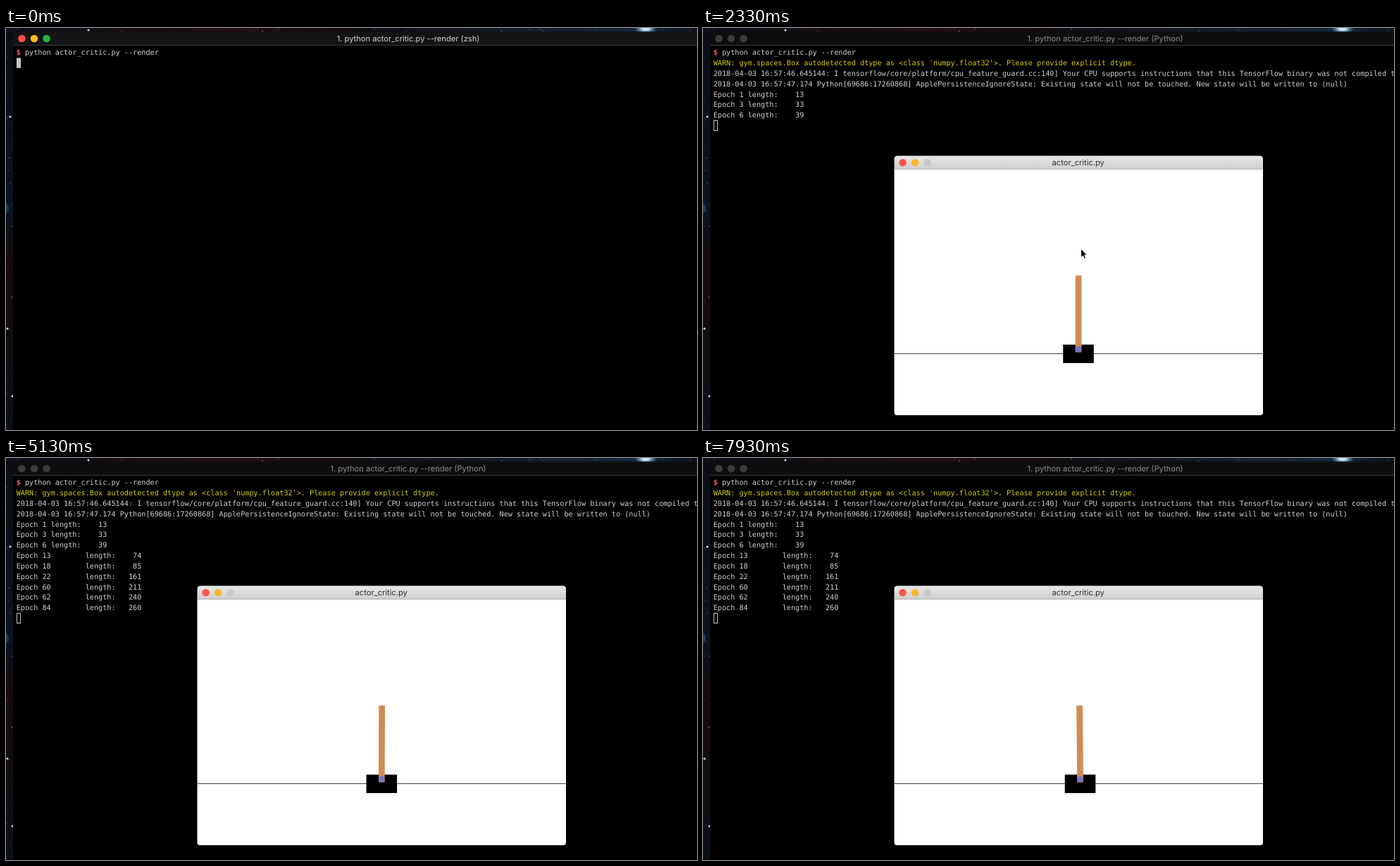
Animation, 981 px wide and 571 px high, one loop 8 s. Source, as an HTML page:

```html
<!DOCTYPE html>
<html lang="en">
<head>
<meta charset="utf-8">
<title>Cart pole training</title>
<style>
  html, body { margin: 0; width: 100%; height: 100%; overflow: hidden; background: #000; }
  svg { display: block; }
  text { text-rendering: geometricPrecision; white-space: pre; }
  .mono { font: 10.185px "DejaVu Sans Mono", monospace; fill: #d2d2d2; }
  .title { font: 11.15px Inter, sans-serif; text-anchor: middle; }
</style>
</head>
<body>
<svg width="981" height="571" viewBox="0 0 981 571">
  <defs>
    <linearGradient id="skyTop">
      <stop offset="0" stop-color="#0b1018"/>
      <stop offset=".33" stop-color="#220e11"/>
      <stop offset=".5" stop-color="#120c12"/>
      <stop offset=".92" stop-color="#14253a"/>
      <stop offset="1" stop-color="#0b111b"/>
    </linearGradient>
    <linearGradient id="skyLeft" x2="0" y2="1">
      <stop offset="0" stop-color="#0a0d14"/>
      <stop offset=".45" stop-color="#0a1420"/>
      <stop offset=".58" stop-color="#16090c"/>
      <stop offset="1" stop-color="#0a0f17"/>
    </linearGradient>
    <radialGradient id="glow">
      <stop offset="0" stop-color="#fff"/>
      <stop offset=".3" stop-color="#b9dcf5"/>
      <stop offset="1" stop-color="#3c78a8" stop-opacity="0"/>
    </radialGradient>
    <linearGradient id="bar" x2="0" y2="1">
      <stop offset="0" stop-color="#e8e8e8"/>
      <stop offset="1" stop-color="#cecece"/>
    </linearGradient>
  </defs>

  <g id="sky">
    <rect width="981" height="8" fill="url(#skyTop)"/>
    <rect y="6" width="12" height="565" fill="url(#skyLeft)"/>
    <ellipse cx="908" cy="1" rx="17" ry="8" fill="url(#glow)"/>
    <ellipse cy="256" rx="4" ry="7" fill="#2b75a8" opacity=".4"/>
  </g>

  <path d="M10 571V10Q10 5.5 14.5 5.5H981V571Z"/>
  <path id="termBar" d="M10 25V10Q10 5.5 14.5 5.5H981V25Z"/>
  <rect x="10" y="24" width="971" height="1" fill="#3b3b3b"/>
  <g id="termLights"></g>
  <text id="termTitle" class="title" x="571" y="19"></text>
  <g id="rows" class="mono"></g>
  <rect id="caret"/>

  <g id="win">
    <path id="winBody" fill="#fff"/>
    <path id="winBar" d="M271.5 201V186Q271.5 181.5 276 181.5H790.5Q795 181.5 795 186V201Z"/>
    <rect id="winEdge" x="271.5" y="200" width="523.5" height="1"/>
    <g id="winLights"></g>
    <text id="winTitle" class="title" x="532.7" y="195.3">actor_critic.py</text>
    <g id="scene">
      <rect x="271.5" y="462.3" width="523.5" height=".75"/>
      <g id="cart">
        <rect x="-21.8" y="449.7" width="43.6" height="26.2"/>
        <rect id="pole" x="-4.36" y="351.6" width="8.72" height="109" fill="#d08b54"/>
        <circle cy="456.2" r="4.36" fill="#7776cb"/>
      </g>
    </g>
  </g>
  <path id="mouse" d="M0 0V12.4L2.9 9.8L4.8 14L6.8 13.1L5 9.1H8.7Z" stroke="#fff" stroke-width=".9"/>
</svg>

<script>
const LOOP = 8000, RATE = 0.015;
const ROW = 14.83, TOP = 34.8;
const EPISODE = 260, FIRST = 1800;    // one printed epoch per episode
const FALLS = 5;                      // early episodes in which the pole tips over
const $ = id => document.getElementById(id);

function add(parent, tag, attrs, text = '') {
  const el = document.createElementNS('http://www.w3.org/2000/svg', tag);
  set(el, attrs);
  el.textContent = text;
  parent.append(el);
  return el;
}
function set(el, attrs) {
  for (const name in attrs) el.setAttribute(name, attrs[name]);
}
function show(el, on) {
  el.style.display = on ? '' : 'none';
}
const mix = (a, b, u) => a + (b - a) * u;
function ease(t, from, to) {
  const u = Math.min(1, Math.max(0, (t - from) / (to - from)));
  return u * u * (3 - 2 * u);
}

// Starry desktop behind the terminal
let seed = 11;
const rand = () => (seed = seed * 16807 % 2147483647) / 2147483647;
const tints = ['#8fa5b8', '#7c4a42', '#54708c', '#6e3030', '#a89888'];
for (let i = 0; i < 260; i++) {
  const top = i < 150;
  add($('sky'), 'circle', {
    cx: rand() * (top ? 981 : 10), cy: rand() * (top ? 5.5 : 571),
    r: 0.3 + rand() ** 3 * 0.8, fill: tints[i % 5], opacity: 0.2 + rand() * 0.45
  });
}
for (const [cx, cy] of [[6, 126], [2, 427], [9, 523], [117, 3]])
  add($('sky'), 'circle', { cx, cy, r: 1.5, fill: '#c9e2f2' });

// Terminal output
const epoch = ([n, length], i) => ({
  at: FIRST + i * EPISODE,
  text: `Epoch ${n}`.padEnd(n < 10 ? 8 : 16) + 'length:' + String(length).padStart(6)
});
const best = { 1: 13, 3: 33, 6: 39, 13: 74, 18: 85, 22: 161, 60: 211, 62: 240, 84: 260 };
const lines = [
  { at: 0, text: '  python actor_critic.py --render' },
  { at: 60, fill: '#d2cf10', text: "WARN: gym.spaces.Box autodetected dtype as <class 'numpy.float32'>. Please provide explicit dtype." },
  { at: 990, text: '2018-04-03 16:57:46.645144: I tensorflow/core/platform/cpu_feature_guard.cc:140] Your CPU supports instructions that this TensorFlow binary was not compiled to use: AVX2 FMA' },
  { at: 1590, text: '2018-04-03 16:57:47.174 Python[69686:17260868] ApplePersistenceIgnoreState: Existing state will not be touched. New state will be written to (null)' },
  ...Object.entries(best).map(epoch)
];
const write = (text, row, style) =>
  add($('rows'), 'text', { x: 14.7, y: TOP + 3.5 + row * ROW, style }, text);
const rows = lines.map(({ text, fill }, i) => write(text, i, fill ? `fill:${fill}` : ''));
write('$', 0, 'fill:#ff5f55;font-weight:bold');

// Window buttons
const lights = (id, x, cy) => [0, 1, 2].map(i =>
  add($(id), 'circle', { cx: x + i * 17.5, cy, r: 5.3 }));
const termLights = lights('termLights', 22.5, 15);
const winLights = lights('winLights', 283.6, 191.2);
const paint = (dots, colours) => dots.forEach((dot, i) => set(dot, { fill: colours[i] }));

// Balanced stretch: [time, cart x, pole angle], with a swaying wobble in between
const keys = [[FIRST + FALLS * EPISODE, 534, 0], [3133, 532.8, 1.3], [4200, 530.2, -2],
  [5133, 533.3, 0.2], [6333, 537.6, 1.3], [7933, 535.5, -0.5], [LOOP, 535.5, -0.5]];

function pose(t) {
  const episode = Math.floor((t - FIRST) / EPISODE);
  if (episode < FALLS) {
    const p = Math.max(0, (t - FIRST) / EPISODE - episode);
    const side = episode % 2 ? -1 : 1;
    return [533 - side * 8 * p * p, side * 10 * p * p];
  }
  const i = Math.max(1, keys.findIndex(key => key[0] >= t));
  const [a, b] = [keys[i - 1], keys[i]];
  const span = b[0] - a[0], u = (t - a[0]) / span;
  const sway = Math.sin(Math.PI * Math.round(span / 270) * u);
  const s = ease(u, 0, 1);
  return [mix(a[1], b[1], s) + sway * 1.5, mix(a[2], b[2], s) - sway * 0.8];
}

function draw(t) {
  const focused = t < 1060, active = t > 1720;

  lines.forEach(({ at }, i) => show(rows[i], t >= at));
  const y = TOP + lines.filter(({ at }) => t >= at).length * ROW;
  set($('caret'), focused
    ? { x: 15, y: y - 7.2, width: 6, height: 14.4, fill: '#c7c7c7', stroke: 'none' }
    : { x: 15.5, y: Math.floor(y - 7.5) + 0.5, width: 5, height: 14, fill: 'none', stroke: '#c7c7c7' });

  set($('termBar'), { fill: focused ? '#141414' : '#0e0e0e' });
  paint(termLights, focused ? ['#ff5149', '#fdb924', '#22b33a'] : Array(3).fill('#3c3c3c'));
  set($('termTitle'), { fill: focused ? '#d2d2d2' : '#8c8c8c' });
  $('termTitle').textContent = `1. python actor_critic.py --render (${active ? 'Python' : 'zsh'})`;

  show($('win'), t > 1650);
  show($('scene'), active);
  set($('winBody'), { d: active
    ? 'M271.5 200H795V546Q795 550 791 550H275.5Q271.5 550 271.5 546Z'
    : 'M271.5 200H795V545H790V550H276.5V545H271.5Z' });
  set($('winBar'), { fill: active ? 'url(#bar)' : '#f5f5f5' });
  set($('winEdge'), { fill: active ? '#b1b1b1' : '#d6d6d6' });
  set($('winTitle'), { fill: active ? '#303030' : '#a0a0a0' });
  paint(winLights, active ? ['#fc544e', '#fdb52a', '#c8c8c8'] : Array(3).fill('#dadada'));

  const [x, angle] = pose(t);
  set($('cart'), { transform: `translate(${x})` });
  set($('pole'), { transform: `rotate(${angle} 0 456.2)` });

  const m = ease(t, 2130, 2930);
  show($('mouse'), t > 1590 && t < 3390);
  set($('mouse'), { transform: `translate(${mix(528.5, 578.7, m)} ${mix(311.5, 324.7, m)})` });
}

const start = performance.now();
function tick(now) {
  const t = Math.max(0, now - start) % LOOP;
  draw(Math.floor((t + 3.4) * RATE) / RATE);
  requestAnimationFrame(tick);
}
draw(0);
requestAnimationFrame(tick);
</script>
</body>
</html>
```
